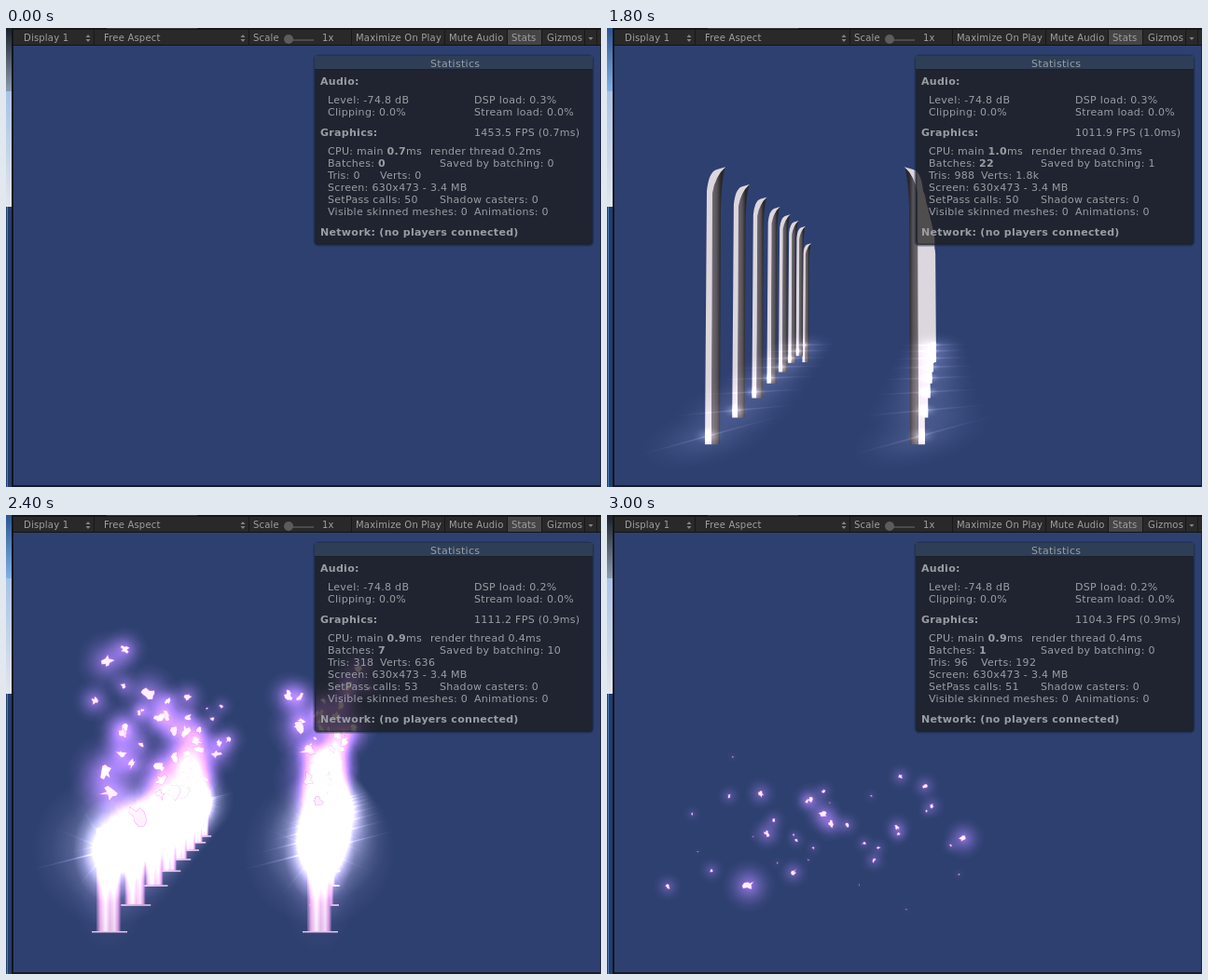
Animation, 638 px wide and 493 px high, one loop 3200 ms. Source, as an HTML page with a canvas:

```html
<!DOCTYPE html>
<html lang="en">
<head>
<meta charset="utf-8">
<title>Pillars of light</title>
<style>
  html, body { margin: 0; width: 100%; height: 100%; overflow: hidden; background: #2e4070; }
  canvas { display: block; }
</style>
</head>
<body>
<canvas id="stage" width="638" height="493"></canvas>
<script>
const ctx = document.getElementById('stage').getContext('2d');
const LOOP = 3200, STEP = 200, ROWS = 8, HORIZON = 267, HEIGHT = 297;
const SANS = '"DejaVu Sans", sans-serif';
const clamp = (v, lo = 0, hi = 1) => Math.min(hi, Math.max(lo, v));
const random = seed => {
  const v = Math.sin(seed * 12.9898) * 43758.5453;
  return v - Math.floor(v);
};

// Two rows of pillars running into the distance, farthest first.
const pillars = [];
for (let i = ROWS - 1; i >= 0; i--) {
  const scale = 1 / (1 + 0.19 * i);
  const base = HORIZON + 180 * scale;
  pillars.push({ i, scale, base, side: 1, x: 288 - 175 * scale });
  pillars.push({ i, scale, base, side: -1, x: 362 - 29 * scale });
}

// Share of each pillar that has dissolved, from the top down.
const dissolved = t => Math.pow(clamp((t - 1960) / 640), 1.25);
const frontY = (p, t) => p.base - HEIGHT * p.scale * (1 - dissolved(t));

// The dissolving edge throws off sparks that drift outwards and sink.
const sparks = pillars.flatMap((p, n) => Array.from({ length: 8 }, (_, k) => {
  const seed = n * 50 + k * 5 + 1;
  const born = 1980 + 70 * (k + random(seed));
  return {
    seed, born,
    life: 300 + 800 * random(seed + 1) ** 1.5,
    size: 14 * Math.sqrt(p.scale) * (0.6 + 0.5 * random(seed + 2)),
    x: p.x, y: frontY(p, born),
    vx: 0.22 * (random(seed + 3) - 0.5),
    vy: -0.16 * random(seed + 4),
  };
}));

// Each entry changes only the named values.
const readings = [
  { at: 0, fps: '1453.5', ms: '0.7', render: '0.2', batches: 0, tris: '0', verts: '0', saved: 0, passes: 50, dsp: '0.3' },
  { at: 1000, batches: 4, tris: '126', verts: '230' },
  { at: 1200, fps: '1070.8', ms: '0.9', render: '0.3', batches: 16, tris: '504', verts: '920' },
  { at: 1400, batches: 24, tris: '756', verts: '1.4k' },
  { at: 1800, fps: '1011.9', ms: '1.0', batches: 22, tris: '988', verts: '1.8k', saved: 1 },
  { at: 2200, fps: '1013.2', batches: 39, tris: '1.2k', verts: '2.3k', saved: 12, passes: 51 },
  { at: 2400, fps: '1111.2', ms: '0.9', render: '0.4', batches: 7, tris: '318', verts: '636', saved: 10, passes: 53, dsp: '0.2' },
  { at: 2800, fps: '1104.3', batches: 1, tris: '96', verts: '192', saved: 0, passes: 51 },
];

function rect(color, x, y, w, h) {
  ctx.fillStyle = color;
  ctx.fillRect(x, y, w, h);
}

function text(str, x, y, bold = false, size = 11) {
  ctx.font = `${bold ? 'bold ' : ''}${size}px ${SANS}`;
  ctx.letterSpacing = size === 11 ? '0.3px' : '0.2px';
  ctx.fillText(str, x, y);
  return x + ctx.measureText(str).width;
}

function triangle(x, y, height) {
  ctx.fillStyle = '#858585';
  ctx.beginPath();
  ctx.moveTo(x - 2.5, y);
  ctx.lineTo(x, y + height);
  ctx.lineTo(x + 2.5, y);
  ctx.fill();
}

function gradient(grad, stops) {
  stops.forEach(([at, color]) => grad.addColorStop(at, color));
  return grad;
}

const vertical = (y0, y1, from, to) => gradient(ctx.createLinearGradient(0, y0, 0, y1), [[0, from], [1, to]]);

// Soft additive ellipse that fades out from the middle.
function glow(x, y, rx, ry, rgb, alpha, angle = 0) {
  ctx.save();
  ctx.globalCompositeOperation = 'lighter';
  ctx.translate(x, y);
  ctx.rotate(angle);
  ctx.scale(rx, ry);
  const stops = [0, 0.25, 0.5, 0.75, 1].map(r => [r, `rgba(${rgb},${alpha * (1 - r) ** 1.6})`]);
  rect(gradient(ctx.createRadialGradient(0, 0, 0, 0, 0, 1), stops), -1, -1, 2, 2);
  ctx.restore();
}

// Sparkle on the ground where a pillar breaks through.
function drawFlare(p, alpha) {
  const x = p.x - 4 * p.side * p.scale, y = p.base - 9 * p.scale;
  const angle = -0.27 / (1 + 2 * p.i);
  glow(x, y, 76 * p.scale, 32 * p.scale, '190,175,200', 0.65 * alpha, angle);
  glow(x, y, 86 * p.scale, 1.6, '220,205,235', 0.6 * alpha, angle);
  glow(x, y, 17 * p.scale, 10 * p.scale, '255,235,255', alpha);
}

// Burst of light at the dissolving edge.
function drawBurst(p, y, power) {
  const x = p.x - 3 * p.side;
  glow(x, y, 82 * p.scale, 82 * p.scale, '190,165,175', 0.55 * power);
  glow(x, y, 38 * p.scale, 56 * p.scale, '255,235,250', 1.1 * power);
  for (let k = 0; k < 5; k++) {
    const reach = k ? 70 : 88;
    glow(x, y, reach * p.scale, 1.5, '200,190,220', (k ? 0.15 : 0.5) * power, k * 0.63 - 0.25);
  }
}

function drawPillar({ x, base, scale, side }, sunk) {
  ctx.save();
  ctx.translate(x, base + sunk * HEIGHT * scale);
  ctx.scale(scale * side, scale);
  ctx.fillStyle = '#dcd6de';
  ctx.fill(new Path2D('M-8 0L-6-272Q-4-292 4-295L14-298L1-265L-1 0Z'));
  ctx.fillStyle = gradient(ctx.createLinearGradient(-1, 0, 9, 0),
    [[0, '#736d74'], [0.6, '#565257'], [1, '#29282d']]);
  ctx.fill(new Path2D('M-1 0L0-270Q3-288 14-298Q10-285 9-255L8 0Z'));
  ctx.restore();
}

function drawBeam(p, t, alpha) {
  const { base, scale } = p;
  const top = frontY(p, t), half = 13 * scale, mid = p.x - p.side * 3 * scale;
  glow(mid, (top + base) / 2, half * 3.2, (base - top) * 0.7, '110,80,110', 0.45 * alpha);
  ctx.globalAlpha = alpha;
  rect(gradient(ctx.createLinearGradient(mid - half, 0, mid + half, 0), [
    [0, 'rgba(205,140,220,.3)'], [0.15, '#dfa9e2'], [0.38, '#fbeeff'], [0.55, '#e2b9e8'],
    [0.75, '#f1d8f6'], [0.9, '#c993d6'], [1, 'rgba(180,120,215,.25)']]), mid - half, top, half * 2, base - top);
  rect('#ecc0ea', mid - 18 * scale, base, 38 * scale, 1.5);
  ctx.globalAlpha = 1;
}

function drawSpark({ seed, born, life, size, x, y, vx, vy }, t) {
  const age = t - born;
  if (age < 0 || age > life) return;
  const r = size * (1 - age / life) ** 0.9;
  const px = x + vx * age, py = y + vy * age + 0.00022 * age * age;
  glow(px, py, 6 + 3 * r, 6 + 3 * r, '170,95,190', 0.6 * clamp(r / 6));
  ctx.save();
  ctx.translate(px, py);
  ctx.rotate(seed);
  ctx.beginPath();
  for (let k = 0; k < 11; k++) {
    const a = k * Math.PI * 2 / 11;
    const reach = r * (0.25 + 0.75 * random(seed + k));
    ctx.lineTo(Math.cos(a) * reach, Math.sin(a) * reach * 0.7);
  }
  ctx.closePath();
  ctx.strokeStyle = 'rgba(225,120,240,.7)';
  ctx.stroke();
  ctx.fillStyle = '#fff0ff';
  ctx.fill();
  ctx.restore();
}

function drawScene(t) {
  ctx.save();
  ctx.beginPath();
  ctx.rect(8, 19, 629, 472);
  ctx.clip();
  rect('#2e4070', 8, 19, 630, 474);
  if (t >= 1000) {
    const progress = (t - 1000) * 0.0115;
    if (t < 2200) pillars.forEach(p => {
      const left = 0.55 - 0.2 * (progress - p.i);
      if (left < 0.79) drawPillar(p, (left + Math.sqrt(left * left + 0.003)) / 2);
    });
    const shine = clamp(1 - (t - 1500) / 400);
    pillars.forEach(p => {
      if (shine && progress >= p.i) drawFlare(p, shine);
    });
    if (t >= 2000 && t < 2600) {
      const power = t < 2200 ? 0.4 : 1;
      pillars.forEach(p => drawBeam(p, t, power));
      pillars.forEach(p => drawBurst(p, frontY(p, t) + 24 * p.scale, power));
    }
    if (t === 2600) pillars.forEach(p => {
      glow(p.x, p.base - 32 * p.scale, 80 * p.scale, 100 * p.scale, '165,140,150', 0.55);
      glow(p.x, p.base - 12 * p.scale, 75 * p.scale, 1.5, '180,175,200', 0.25, -0.25 + p.i);
    });
    sparks.forEach(s => drawSpark(s, t));
  }
  ctx.restore();
}

function drawStats({ fps, ms, render, batches, tris, verts, saved, passes, dsp }) {
  ctx.beginPath();
  ctx.roundRect(331, 30, 298, 203, 4);
  ctx.fillStyle = 'rgba(28,27,26,.73)';
  ctx.fill();
  ctx.strokeStyle = 'rgba(22,36,58,.5)';
  ctx.lineWidth = 3;
  ctx.stroke();
  ctx.lineWidth = 1;
  rect('#2e3e56', 331, 30, 298, 14);
  rect('#1b202b', 331, 44, 298, 1);

  ctx.fillStyle = '#9a9ea3';
  text('Statistics', 455, 42);
  text('Audio:', 337, 61, true);
  text('Level: -74.8 dB', 345, 81);
  text(`DSP load: ${dsp}%`, 502, 81);
  text('Clipping: 0.0%', 345, 94);
  text('Stream load: 0.0%', 502, 94);
  text('Graphics:', 337, 116, true);
  text(`${fps} FPS (${ms}ms)`, 502, 116);
  const unit = text(ms, text('CPU: main ', 345, 136), 136, true);
  text('ms', unit, 136);
  text(`render thread ${render}ms`, 455, 136);
  text(String(batches), text('Batches: ', 345, 149), 149, true);
  text(`Saved by batching: ${saved}`, 465, 149);
  text(`Tris: ${tris}`, 345, 162);
  text(`Verts: ${verts}`, tris.endsWith('k') ? 465 : 401, 162);
  text('Screen: 630x473 - 3.4 MB', 345, 175);
  text(`SetPass calls: ${passes}`, 345, 188);
  text('Shadow casters: 0', 465, 188);
  text('Visible skinned meshes: 0', 345, 201);
  text('Animations: 0', 502, 201);
  text('Network: (no players connected)', 337, 223, true);
}

function drawToolbar() {
  rect('#292929', 8, 0, 630, 18);
  rect('#161616', 8, 0, 630, 2);
  rect('#3a3a3a', 108, 0, 97, 1);
  rect('#111317', 8, 18, 630, 1);
  rect('#454545', 538, 2, 36, 16);
  [94, 260, 370, 470, 537, 574, 620, 633].forEach(x => rect('#181818', x, 2, 1, 16));
  ctx.fillStyle = '#a0a0a0';
  [['Display 1', 19], ['Free Aspect', 105], ['Scale', 265], ['1x', 339], ['Maximize On Play', 375],
    ['Mute Audio', 475], ['Stats', 542], ['Gizmos', 580]].forEach(([label, x]) => text(label, x, 14, false, 10));
  [88, 254].forEach(x => {
    triangle(x, 10, -3);
    triangle(x, 12, 3);
  });
  triangle(627, 10, 3);
  rect('#4b4b4b', 303, 12, 27, 2);
  ctx.fillStyle = '#5c5c5c';
  ctx.beginPath();
  ctx.arc(303, 12, 5, 0, 7);
  ctx.fill();
}

function drawWindowEdge(idle) {
  rect('#243d6a', 0, 0, 7, 493);
  rect(idle ? vertical(0, 68, '#1a2029', '#8d9bb0') : vertical(0, 68, '#2c558f', '#7fb0ea'), 0, 0, 6, 68);
  rect(vertical(68, 192, '#a9c2e6', '#e2e6ec'), 0, 68, 6, 124);
  rect('#4a7dbd', 1, 192, 1, 301);
  rect('#10151f', 6, 0, 2, 493);
  rect('#141a28', 8, 491, 630, 2);
  rect('#1d2740', 637, 19, 1, 474);
}

function drawCursor(x, y) {
  ctx.save();
  ctx.translate(x, y);
  const arrow = new Path2D('M0 0V16L4 12L7 19L9.5 18L6.5 11.5H11.5Z');
  ctx.fillStyle = '#fff';
  ctx.fill(arrow);
  ctx.strokeStyle = '#111';
  ctx.stroke(arrow);
  ctx.restore();
}

function frame() {
  const now = performance.now() % LOOP;
  const t = now < 1000 ? 0 : Math.floor(now / STEP) * STEP;
  drawScene(t);
  drawWindowEdge(t === 0 || t === 3000);
  drawToolbar();
  drawStats(Object.assign({}, ...readings.filter(r => r.at <= t)));
  if (t === 1400) drawCursor(13, 197);
  if (t === 1600) drawCursor(2, 222);
  requestAnimationFrame(frame);
}
frame();
</script>
</body>
</html>
```
